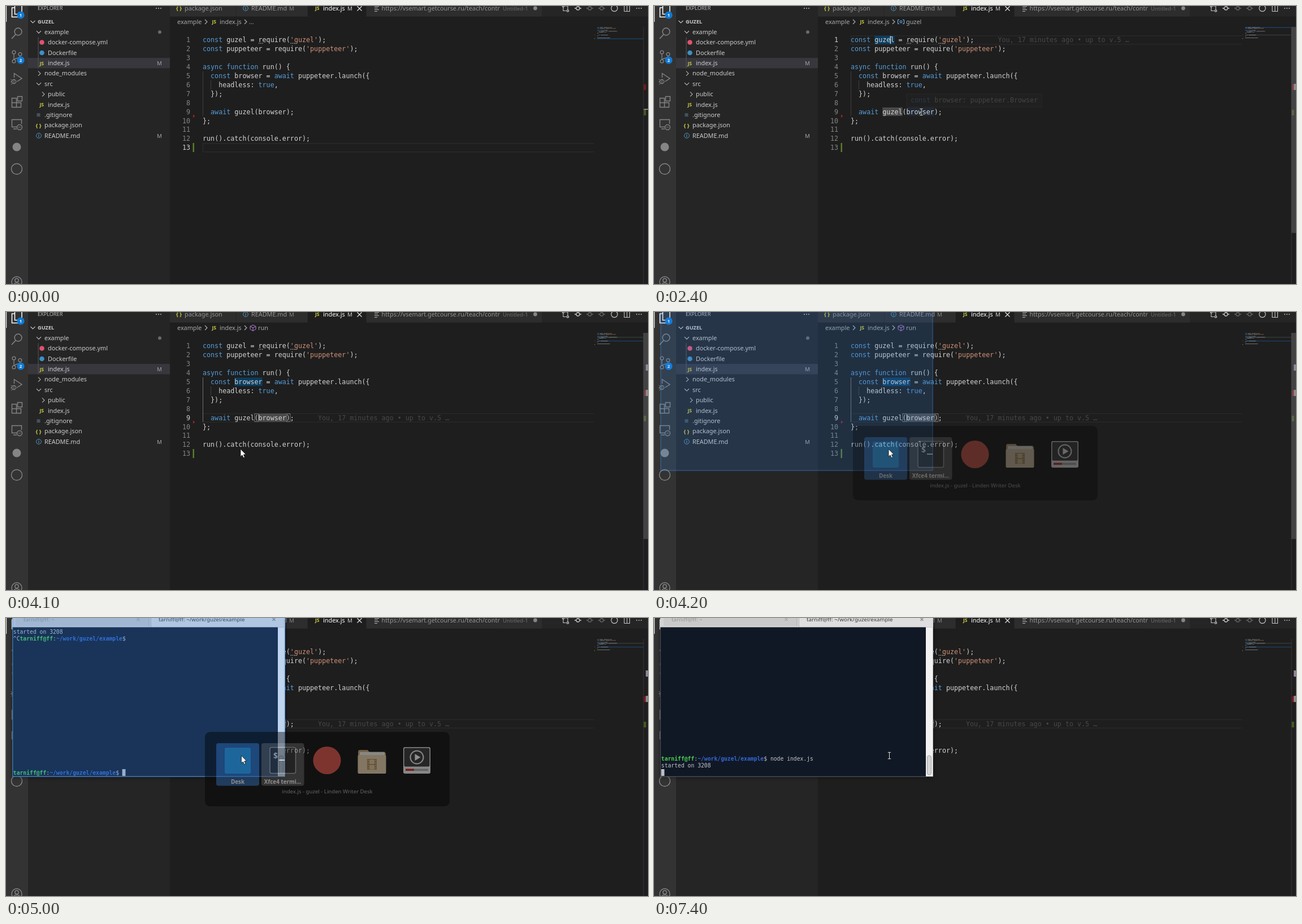
Recreate the animation shown at these times as an HTML page. Size 1136 by 493 pixels, loop 8 s.

```html
<!DOCTYPE html>
<html lang="en">
<head>
<meta charset="utf-8">
<title>Editor and terminal</title>
<style>
html, body { margin: 0; width: 100%; height: 100%; overflow: hidden; background: #1e1e1e; }
svg { display: block; width: 1136px; height: 493px; }
text { white-space: pre; font: 10.84px "Noto Sans", "Open Sans", sans-serif; fill: #ccc; }
text.mono { font: 11.7px "DejaVu Sans Mono", monospace; fill: #d4d4d4; }
text.term { font: 9.72px "DejaVu Sans Mono", monospace; fill: #c3c6cb; }
.b { font-weight: bold; }
.shadow { filter: drop-shadow(0 1px 3px rgba(0, 0, 0, .5)); }
</style>
</head>
<body>
<svg id="stage" viewBox="0 0 1136 493"></svg>
<script>
const LOOP = 8000, CH = 7.046, LH = 15.9, LEFT = 348;
const LINES = [
  "const guzel = require('guzel');",
  "const puppeteer = require('puppeteer');",
  "",
  "async function run() {",
  "  const browser = await puppeteer.launch({",
  "    headless: true,",
  "  });",
  "",
  "  await guzel(browser);",
  "};",
  "",
  "run().catch(console.error);",
  ""
];
const midY = n => 60.2 + (n - 1) * LH;
const colX = c => LEFT + c * CH;
const mapY = n => 37.6 + (n - 1) * 1.67;

// Drawing helpers
const text = (x, y, s, fill = '#ccc', size = 10.84, attr = '') =>
  `<text x="${x}" y="${y}" style="fill:${fill};font-size:${size}px" ${attr}>${s}</text>`;
const rect = (x, y, w, h, fill, attr = '') =>
  `<rect x="${x}" y="${y}" width="${w}" height="${h}" fill="${fill}" ${attr}/>`;
const disc = (x, y, r, fill) => `<circle cx="${x}" cy="${y}" r="${r}" fill="${fill}"/>`;
const ring = (x, y, r, stroke, w = 1.3) =>
  `<circle cx="${x}" cy="${y}" r="${r}" fill="none" stroke="${stroke}" stroke-width="${w}"/>`;
const line = (d, stroke, w = 1.1) => `<path d="${d}" fill="none" stroke="${stroke}" stroke-width="${w}"/>`;
const group = (id, body) => `<g id="${id}">${body}</g>`;
const right = (x, y, c = '#b5b5b5') => line(`M${x - 2} ${y - 4}l4 4l-4 4`, c);
const down = (x, y, c = '#c5c5c5') => line(`M${x - 4} ${y - 2}l4 4l4 -4`, c);
const js = (x, y) => text(x, y, 'JS', '#cbcb41', 8.6, 'class="b"');
const braces = (x, y) => text(x, y, '{ }', '#cbcb41', 9.6, 'class="b"');
const info = (x, y) => ring(x, y, 4.4, '#519aba', 1) + rect(x - .6, y - .8, 1.2, 3.2, '#519aba') + rect(x - .6, y - 2.6, 1.2, 1.2, '#519aba');
const dots = (x, y, c) => [-4, 0, 4].map(d => disc(x + d, y, .95, c)).join('');

function tokens(s) {
  return [...s.matchAll(/'.*?'|\w+|[^\w']+/g)].map(m => ({
    s: m[0], i: m.index,
    color: m[0][0] === "'" ? '#ce9178' : /^(const|async|function|await|true)$/.test(m[0]) ? '#569cd6' : '#d4d4d4'
  }));
}

function activityBar() {
  const g = '#858585', w = '#fff';
  const badge = (x, y, n) => disc(x, y, 6.6, '#0f7ad4') + text(x, y + 2.9, n, '#fff', 7.8, 'text-anchor="middle" class="b"');
  return rect(0, 0, 39, 493, '#333') + rect(0, 0, 1.2, 28, '#e0e0e0') +
    line('M15 3H10.5V19.5H22.5V16M15.5 -6V14.5H28V0L23 -5H15.5', w, 1.5) + badge(26, 16, 1) +
    ring(21.5, 45.5, 6.4, g, 1.5) + line('M17 50.5L10 58', g, 1.7) +
    ring(14, 82, 2.9, g) + ring(14, 98, 2.9, g) + ring(25, 85.5, 2.9, g) +
    line('M14 85V95M25 88.5C25 93 18 91 14.5 95', g, 1.3) + badge(26, 96, 2) +
    line('M14.5 127V119.5L28 128.5L19.5 134', g, 1.4) + ring(14, 134, 3.6, g) + line('M8.5 130L11 132M8 134.5H10.5M9 139.5L11.5 137M14 130.5V137.5', g, 1) +
    line('M10.5 163.5H18.5V179.5H10.5ZM10.5 171.5H26.5V179.5H18.5M20.5 160.5H28.5V168.5H20.5Z', g, 1.4) +
    line('M20 214.5H10.5V201.5H27.5V209M13 218H19', g, 1.4) + ring(24, 215, 4.5, g) + line('M22 213.5l1.5 1.5l-1.5 1.5M26 213.5l-1.5 1.5l1.5 1.5', g, .8) +
    disc(19, 250, 7.5, g) + ring(19, 289, 9.5, g, 1.4) +
    ring(19, 489, 9, g, 1.4) + ring(19, 486.5, 3.2, g, 1.4) + line('M13 496C14 489.5 24 489.5 25 496', g, 1.4);
}

function sidebar() {
  const rows = [
    ['example', 68, y => down(58, y) + disc(272, y, 3, '#6a6a6a')],
    ['docker-compose.yml', 74, y => disc(63.5, y, 4.3, '#e0526f')],
    ['Dockerfile', 74, y => disc(63.5, y, 4.3, '#3d8fc4')],
    ['index.js', 74, y => js(59.5, y + 3.2), 1],
    ['node_modules', 68, y => right(59, y)],
    ['src', 68, y => down(58, y)],
    ['public', 74, y => right(66, y)],
    ['index.js', 74, y => js(59.5, y + 3.2)],
    ['.gitignore', 68, y => rect(54.5, y - 3, 6, 6, '#41535b')],
    ['package.json', 68, y => braces(52.5, y + 3)],
    ['README.md', 68, y => info(58, y), 1]
  ];
  return rect(39, 0, 251, 493, '#252526') + text(56, 7, 'EXPLORER', '#bbb', 9.2) + dots(270, 4, '#c5c5c5') +
    down(47.5, 28) + text(56, 31.4, 'GUZEL', '#ccc', 9.2, 'class="b"') +
    rect(39, 92, 251, 18.4, '#37373d') + rect(56.6, 55.3, 1, 55, '#585858') +
    rows.map(([name, x, icon, mod], i) => {
      const y = 46.2 + i * 18.37;
      return icon(y) + text(x, y + 3.8, name) + (mod ? text(267, y + 3.6, 'M', '#a5a5a5', 9.8) : '');
    }).join('');
}

function tabs() {
  const b = '#c5c5c5', d = '#666';
  const commit = (x, c) => ring(x, 4, 3, c) + line(`M${x - 6} 4h3M${x + 3} 4h3`, c, 1.3);
  return rect(290, 0, 846, 18.6, '#252526') +
    rect(290, 0, 117, 18.6, '#2d2d2d') + rect(408, 0, 125.5, 18.6, '#2d2d2d') +
    rect(534, 0, 103, 18.6, '#1e1e1e') + rect(638, 0, 310, 18.6, '#2d2d2d') +
    braces(301, 7) + text(316, 7.8, 'package.json', '#969696') +
    info(424, 4) + text(434, 7.8, 'README.md', '#969696') + text(501, 7.8, 'M', '#858585', 9.8) +
    js(547, 7.4) + text(561, 7.8, 'index.js', '#fff') + text(604, 7.8, 'M', '#d0d0d0', 9.8) +
    line('M621.5 .5l8 8M629.5 .5l-8 8', '#e0e0e0', 1.2) +
    line('M652 .5h8M652 3.5h6M652 6.5h8M652 9.5h5', '#b5b5b5', 1) +
    text(664.5, 7.8, 'https://vsemart.getcourse.ru/teach/contr', '#969696') + text(879, 7.8, 'Untitled-1', '#6f6f6f', 9.6) +
    disc(936.5, 4, 3.4, '#858585') +
    ring(986, 0, 1.7, b) + ring(994, 8.5, 1.7, b) + line('M986 2V8.5H991M994 6.5V0H989', b) +
    commit(1012, b) + commit(1033, d) + commit(1054, d) + ring(1076.5, 4, 5.6, b, 1.2) +
    line('M1094 -1H1103.5V9.5H1094ZM1098.8 -1V9.5', b) + dots(1120, 4, b);
}

function editor() {
  const word = (c, n, len, fill) => rect(colX(c), midY(n) - 7.5, len * CH, 15, fill);
  const bracket = c => rect(colX(c) + .4, midY(9) - 7, CH - .6, 14, 'none', 'stroke="#858585" stroke-width=".9"');
  const mapHit = n => rect(1046, mapY(n) - .3, 82, 1.6, '#343638');
  const body = LINES.map((s, i) => {
    const spans = tokens(s).map(k => `<tspan fill="${k.color}">${k.s}</tspan>`).join('');
    return `<text class="mono num" x="326" y="${midY(i + 1) + 4.2}" text-anchor="end">${i + 1}</text>` +
      `<text class="mono" x="${LEFT}" y="${midY(i + 1) + 4.2}">${spans}</text>`;
  }).join('');
  const mini = LINES.map((s, i) => tokens(s).filter(k => k.s.trim()).map(k =>
    rect(1046 + k.i * .84, mapY(i + 1), k.s.trim().length * .84, 1, k.color, 'opacity=".45"')).join('')).join('');
  const hint = x => [0, 3, 6].map(d => rect(x + d, 65.5, 1.5, 1.3, '#b0b0b0')).join('');
  const blue = '#0b3d5f', grey = '#4a4a4a';
  return rect(290, 18, 846, 475, '#1e1e1e') + tabs() +
    text(303, 31.8, 'example', '#a9a9a9') + right(354, 28) + js(364.5, 31) + text(378, 31.8, 'index.js', '#a9a9a9') + right(424, 28) +
    group('crumbNone', text(430, 31.8, '...', '#a9a9a9')) +
    group('crumbVar', line('M434 24.5H431.5V31.5H434M440 24.5H442.5V31.5H440', '#75beff', 1) + ring(437, 28, 2, '#75beff', 1) + text(446, 31.8, 'guzel', '#a9a9a9')) +
    group('crumbFn', line('M437 23L442 25.5V30.5L437 33.5L432 30.5V25.5ZM432 25.5L437 28L442 25.5M437 28V33.5', '#b180d7', 1) + text(446, 31.8, 'run', '#a9a9a9')) +
    group('rowMark', line('M1040 -7.3H348.5V7.7H1040', '#2a2a2a', 1.4)) +
    group('hlVar', word(6, 1, 5, blue) + word(8, 9, 5, grey) + mapHit(9)) +
    group('hoverMark', word(14, 9, 7, '#212a35')) +
    group('hlFn', word(8, 5, 7, blue) + word(14, 9, 7, grey) + mapHit(5)) +
    `<path id="guide" d="M348.5 116V195" stroke-width="1"/>` + line('M362.5 132V148', '#404040', 1) +
    group('brackets', bracket(13) + bracket(21)) + body + hint(447) + hint(503.5) +
    rect(330.5, 243, 2.5, 16, '#587c2c') + `<path d="M331 192.5l3.3 2.7l-3.3 2.7z" fill="#a4262c"/>` +
    `<text id="blame" class="mono" style="fill:#484848">You, 17 minutes ago • up to v.5 …</text>` +
    rect(0, 0, 1.4, 13.5, '#e0e0e0', 'id="caret"') +
    group('tip', rect(447, 156, 239, 23, '#202021', 'stroke="#292929"') +
      `<text class="mono" x="454" y="171" style="fill:#444"><tspan fill="#2b3b49">const</tspan> browser: puppeteer.Browser</text>`) +
    rect(1046, 0, 82, 1.7, '#1f3b57', 'id="mapMark"') + mini + rect(1041, 50.5, 1.2, 1.5, '#94151b') + rect(1041, 57, 1.2, 1.5, '#587c2c') +
    rect(1127.5, 37, 1, 456, '#353535') + rect(1128.5, 139, 4, 10, '#741c22') + rect(1128.5, 184, 4, 10, '#455c1f') +
    group('ruler13', rect(1128.5, 182.5, 7.5, 1.5, '#a0a0a0')) +
    rect(1128, 37, 8, 365.5, '#797979', 'id="slider" opacity=".4"') +
    group('ruler5', rect(1132, 93, 4, 11, '#8f8496')) + group('ruler9', rect(1132, 138, 4, 11, '#8f8787'));
}

const USER = 'tarniff@ff';
const ROW_H = 12.5, CELL = 5.85;
const shell = (n, body) => `<text class="term" x="12.8" y="${27.7 + n * ROW_H}">${body}</text>`;
const prompt = `<tspan class="b" fill="#4bd052">${USER}</tspan>:<tspan class="b" fill="#3368d6">~/work/guzel/example</tspan>$ `;
const block = col => rect(12.6 + col * CELL, 268, 5.8, 12, '#bcbec3');

function terminal() {
  const start = 'started on 3208', cmd = 'node index.js ';
  const close = (x, c) => line(`M${x - 2.5} 0l5 5m0 -5l-5 5`, c, 1.3);
  return rect(11, 0, 483, 281.5, '#7d838b', 'class="shadow"') + rect(11, 0, 483, 16.5, '#d3d3d3') +
    rect(17, 0, 235.5, 14, '#c9c9c9') + rect(256.5, 0, 237, 16, '#dedede') +
    rect(252.5, 0, 1, 14, '#aaa') + rect(256, 0, 1, 16, '#b5b5b5') +
    text(31, 6.2, USER + ': ~', '#949494', 9.8) + close(234, '#aaa') +
    text(270, 6.2, USER + ': ~/work/guzel/example', '#3c3c3c', 9.8) + close(474, '#8a8a8a') +
    rect(11.5, 16.5, 469.5, 264.3, '#111825') + rect(481, 16.5, 12.5, 264.3, '#f1f1f1') +
    rect(483.5, 244, 7, 34, '#d5d5d5', 'rx="3" stroke="#999" stroke-width=".9"') +
    group('before', shell(0, start) + shell(1, '^C' + prompt) + shell(20, prompt)) +
    group('idle', block(33)) + group('typed', shell(20, ' '.repeat(33) + cmd) + block(47)) +
    group('sent', shell(0, '^C' + prompt) + shell(19, prompt + cmd) + block(0)) +
    group('running', shell(18, prompt + cmd) + shell(19, start) + block(0));
}

function switcher() {
  const label = (x, s) => text(x, 293.5, s, '#fff', 9.9, 'text-anchor="middle" class="b"');
  return rect(352, 202, 433, 132, '#000', 'rx="9" opacity=".84"') +
    rect(372, 222, 76, 75.5, '#245b9c', 'rx="4"') + rect(387, 230, 46, 46, '#2199e0', 'rx="3"') + label(410, 'Desk') +
    rect(452, 222, 75.5, 75.5, '#4b4b4b', 'rx="4"') +
    rect(467, 229.5, 45.5, 46, '#292929', 'rx="3" stroke="#a9a9a9" stroke-width="1.5"') +
    text(473, 249, '$', '#eee', 14, 'class="b"') + rect(483, 251, 10, 2, '#eee') + label(489.5, 'Xfce4 termi...') +
    disc(568, 252.5, 24.5, '#dd4b3e') +
    `<path d="M623 238q0 -4 3 -4h14l3 4h26q3 0 3 3v33h-49z" fill="#c39f6e"/>` + rect(626, 237.5, 44, 8, '#f3efe6') +
    rect(622.5, 243, 50, 33, '#e7cfaa', 'rx="2"') + rect(639, 250, 17, 19, '#a5834f') +
    rect(643, 251, 9, 8, '#e1c597') + rect(643, 260.5, 9, 8, '#e1c597') +
    [0, 1, 2, 3].map(i => rect(640, 251.5 + i * 4.5, 1.5, 2, '#e7cfaa') + rect(653.5, 251.5 + i * 4.5, 1.5, 2, '#e7cfaa')).join('') +
    rect(703, 229, 48, 47, '#f0f0f0', 'rx="3"') + rect(704.5, 230.5, 45, 33, '#2e2e2e', 'rx="2"') +
    ring(727, 247, 11.5, '#f2f2f2', 2) + `<path d="M723.5 241l10 6l-10 6z" fill="#fff"/>` +
    rect(707, 267.5, 40, 3.5, '#aaa') + rect(707, 267.5, 15, 3.5, '#d0201c') +
    text(568.5, 311, 'index.js - guzel - Linden Writer Desk', '#a8a8a8', 9.6, 'text-anchor="middle"');
}

const BEAM = 'M-2.7 -5.7H2.7M0 -5.7V5.7M-2.7 5.7H2.7';
const stage = document.getElementById('stage');
stage.innerHTML = editor() + sidebar() + activityBar() + group('terminal', terminal()) +
  group('outline', rect(12, -3, 481, 284, '#3385e9', 'fill-opacity=".52" stroke="#3f93ee" stroke-width="2"')) +
  group('switcher', switcher()) +
  group('beam', line(BEAM, '#111', 2) + line(BEAM, '#e4e4e4', 1)) +
  group('arrow', `<path d="M0 0V13.5L3 10.8L5.2 15.5L7.5 14.5L5.3 10L9.3 9.6Z" fill="#fff" stroke="#111" stroke-width=".8"/>`);

const el = {};
stage.querySelectorAll('[id]').forEach(e => el[e.id] = e);
const numbers = stage.querySelectorAll('.num');
const show = (id, on) => el[id].setAttribute('visibility', on ? 'visible' : 'hidden');
const move = (id, x, y) => el[id].setAttribute('transform', `translate(${x} ${y})`);
const ramp = (t, a, b) => Math.min(1, Math.max(0, (t - a) / (b - a)));

// Pointer stops: time, x, y
const PATH = [[300, 560, 28], [1000, 418, 60], [1400, 418, 60], [2100, 473, 188],
  [3000, 473, 188], [3300, 395, 106], [3500, 395, 106], [4100, 415, 243], [5100, 416.5, 244]];
function pointerAt(t) {
  const i = PATH.findIndex(p => p[0] > t);
  if (i < 1) return PATH.at(i).slice(1);
  const a = PATH[i - 1], b = PATH[i], u = ramp(t, a[0], b[0]), e = u * u * (3 - 2 * u);
  return [a[1] + (b[1] - a[1]) * e, a[2] + (b[2] - a[2]) * e];
}

function draw(ms) {
  const t = Math.floor(ms / 100) * 100; // the screen refreshes ten times a second
  const during = (a, b = LOOP) => t >= a && t < b;
  const row = t < 1200 ? 13 : t < 2800 ? 1 : 9;

  numbers.forEach((n, i) => n.style.fill = i + 1 === row ? '#d0d0d0' : '#858585');
  move('rowMark', 0, midY(row));
  el.mapMark.setAttribute('y', mapY(row) - .3);
  el.guide.setAttribute('stroke', row === 9 ? '#707070' : '#404040');
  show('crumbNone', row === 13);
  show('crumbVar', row === 1);
  show('crumbFn', row === 9);
  show('ruler13', row === 13);
  show('hlVar', during(1500, 2800));
  show('hoverMark', during(2400, 2800));
  show('tip', during(2400, 2800));
  show('hlFn', during(3100));
  show('brackets', during(2800, 5000));
  show('ruler5', during(2900));
  show('ruler9', during(1500));
  show('slider', during(300, 4300));

  show('blame', during(1500, 2800) || during(2900));
  el.blame.setAttribute('x', row === 9 ? 552 : 608.5);
  el.blame.setAttribute('y', midY(row) + 4.2);
  show('caret', during(1200, 1600) || during(2100, 3300) || during(3600, 4100) || during(4600, 5000));
  move('caret', row === 9 ? 474.5 : 417.7, midY(row) - 6.8);

  show('terminal', during(5000));
  show('before', during(5000, 7100));
  show('idle', during(5000, 6000));
  show('typed', during(6000, 7100));
  show('sent', during(7100, 7400));
  show('running', during(7400));
  const veil = ramp(t, 4100, 4400) * (1 - ramp(t, 4900, 5100));
  el.outline.setAttribute('opacity', veil);
  el.switcher.setAttribute('opacity', veil);

  const [x, y] = pointerAt(t), arrow = during(4100, 5100);
  show('beam', t >= 300 && !arrow);
  show('arrow', arrow);
  move('beam', x, y);
  move('arrow', x, y);
}

function tick() {
  draw(performance.now() % LOOP);
  requestAnimationFrame(tick);
}
tick();
</script>
</body>
</html>
```
